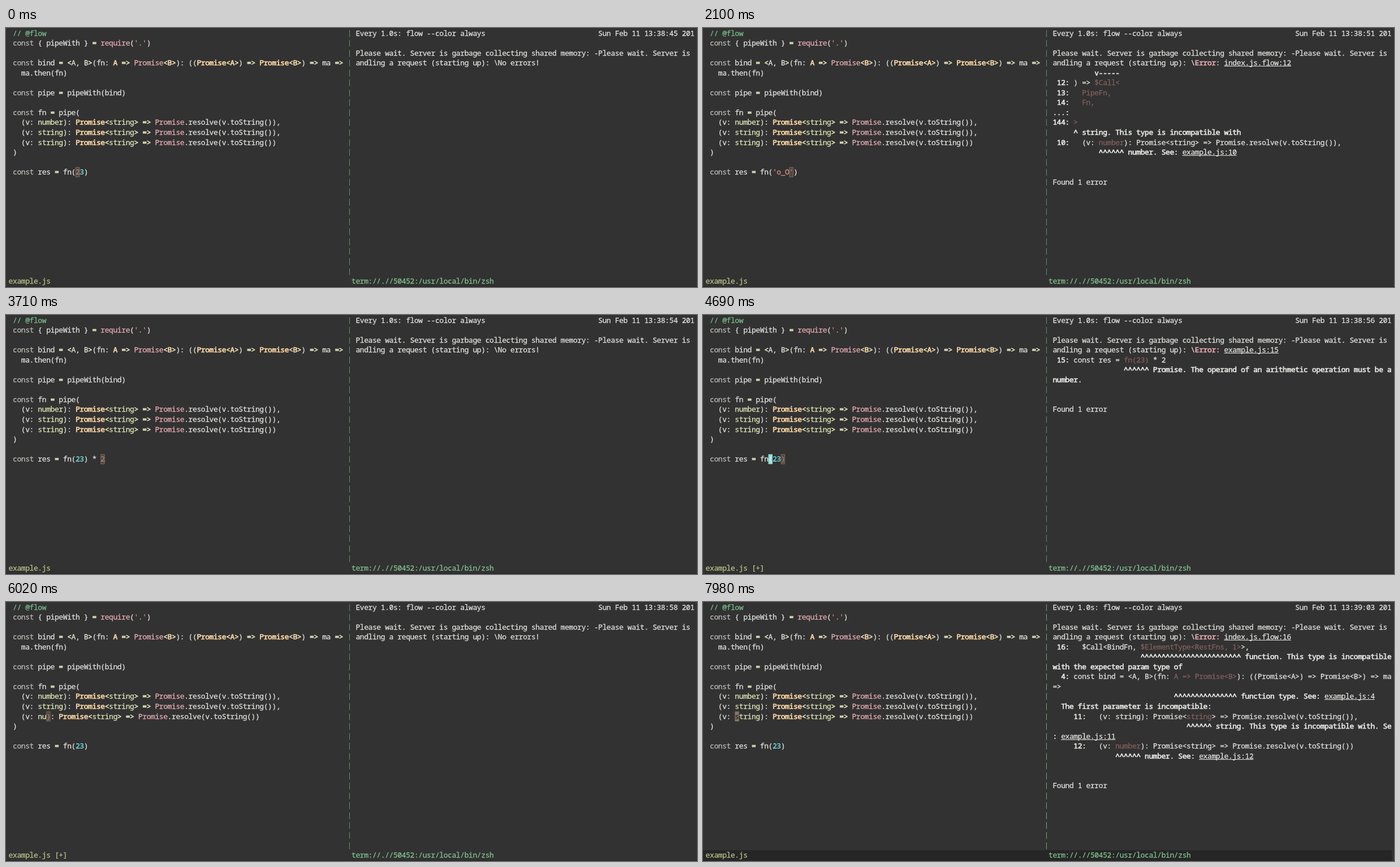
Recreate the animation shown at these times as an HTML page with a canvas. Size 1222 px wide and 458 px high, loop 8000 ms.

```html
<!DOCTYPE html>
<html lang="en">
<head>
<meta charset="utf-8">
<title>Terminal session</title>
<style>
html, body { margin: 0; width: 100%; height: 100%; overflow: hidden; background: #323232; }
canvas { display: block; }
</style>
</head>
<body>
<canvas id="stage" width="1222" height="458"></canvas>
<script>
const ctx = document.getElementById('stage').getContext('2d');
const LOOP = 8000, W = 1222, H = 458;
const CELL = 7.395, ROW = 17.54, LEFT = 4.6, BASE = 13.6;
const CODE = 1, PANE = 83;
const FACE = '13px "Noto Sans Mono", "DejaVu Sans Mono", monospace';

const BG = '#323232', TEXT = '#e0e0de', GREEN = '#82c08f';
// Inline markup: ~x...~ paints the enclosed text in style x
const STYLES = {
  b: { color: '#e6e6e4', bold: true },
  c: { color: '#78bb88' },
  k: { color: '#b6b6b2' },
  a: { color: '#e0e2bb', bold: true },
  o: { color: '#ffd9a5', bold: true },
  l: { color: '#dfe5b5' },
  p: { color: '#e6abb3' },
  n: { color: '#76dede' },
  s: { color: '#dc8d82' },
  d: { color: '#805f5d' },
  e: { color: '#eaa9b2', bold: true },
  u: { color: TEXT, underline: true }
};

const colX = col => LEFT + col * CELL;
const rowY = row => BASE + row * ROW;

function fill(x, y, w, h, color) {
  ctx.fillStyle = color;
  ctx.fillRect(x, y, w, h);
}

// A fine outline gives the glyphs their smoothed, heavier look
function put(text, col, row, { color = TEXT, bold, underline } = {}) {
  ctx.font = FACE;
  ctx.fillStyle = ctx.strokeStyle = color;
  ctx.lineWidth = bold ? 0.7 : 0.3;
  ctx.lineJoin = 'round';
  [...text].forEach((ch, i) => {
    if (ch === ' ') return;
    ctx.fillText(ch, colX(col + i), rowY(row));
    ctx.strokeText(ch, colX(col + i), rowY(row));
  });
  if (underline) ctx.fillRect(colX(col), Math.round(rowY(row) + 1), text.length * CELL, 1);
}

function line(src, col, row) {
  src.split('~').forEach((part, i) => {
    const marked = i % 2 === 1;
    const text = marked ? part.slice(1) : part;
    put(text, col, row, marked ? STYLES[part[0]] : undefined);
    col += text.length;
  });
}

const lines = (list, col, row) => list.forEach((s, i) => line(s, col, row + i));

// Editor
const step = (type, end) =>
  `  (v: ~l${type}~): ~oPromise~~a<~~lstring~~a>~ ~a=>~ ~pPromise~.resolve(v.toString())${end}`;

const code = s => [
  '~c// @flow~',
  "~kconst~ { pipeWith } ~a=~ ~prequire~(~s'.'~)",
  '',
  '~kconst~ bind ~a=~ ~a<~A, B~a>~(fn: ~oA~ ~a=>~ ~pPromise~~a<~~oB~~a>~): ((~oPromise~~a<~~oA~~a>~) ~a=>~ ~oPromise~~a<~~oB~~a>~) ~a=>~ ma ~a=>~',
  '  ma.then(fn)',
  '',
  '~kconst~ pipe ~a=~ pipeWith(bind)',
  '',
  '~kconst~ fn ~a=~ pipe(',
  step('number', ','),
  step('string', ','),
  step(s.type, ''),
  ')',
  '',
  `~kconst~ res ~a=~ fn(~${s.arg[0] === "'" ? 's' : 'n'}${s.arg}~)${s.tail}`
];

// Edits over time; each entry changes only what it names.
// cur: [row, column, character, look], match: [row, column]
const call = (i, ch, look = 'dim') => [14, i, ch, look];
const param = (i, ch, look = 'dim') => [11, i, ch, look];
const edits = [
  [0, { arg: '23', tail: '', type: 'string', dirty: false, cur: call(15, '2'), match: null, cmd: false }],
  [400, { arg: '', dirty: true, cur: call(15, ')') }],
  [540, { arg: "'", cur: call(16, ')') }],
  [660, { arg: "'o", cur: call(17, ')') }],
  [800, { arg: "'o_", cur: call(18, ')') }],
  [940, { arg: "'o_O", cur: call(19, ')') }],
  [1060, { arg: "'o_O'", cur: call(19, "'") }],
  [1320, { cur: null, cmd: true }],
  [1490, { dirty: false, cur: call(19, "'"), cmd: false }],
  [2380, { arg: '23', dirty: true, cur: call(15, '2') }],
  [2600, { dirty: false }],
  [3080, { tail: ' ', dirty: true, cur: call(19, ' ') }],
  [3190, { tail: ' *', cur: call(20, ' ') }],
  [3300, { tail: ' * ', cur: call(21, ' ') }],
  [3410, { tail: ' * 2', cur: call(21, '2') }],
  [3680, { dirty: false }],
  [4480, { tail: '', dirty: true, cur: call(17, ')'), match: [14, 14] }],
  [4850, { dirty: false }],
  [5250, { cur: param(6, 's', 'block'), match: null }],
  [5530, { cur: param(6, 's', 'line') }],
  [5820, { type: '', dirty: true, cur: param(6, ')') }],
  ...[...'number'].map((_, i) => [
    5900 + i * 80,
    { type: 'number'.slice(0, i + 1), cur: param(7 + i, ')'), match: i === 5 ? [11, 2] : null }
  ]),
  [6580, { dirty: false }],
  [7440, { type: 'string', dirty: true, cur: param(6, 's', 'block'), match: null }],
  [7690, { dirty: false }]
];

function cursor([row, col, ch, look]) {
  const x = colX(CODE + col), y = rowY(row) - 13;
  if (look === 'line') return fill(x, y + ROW - 1, CELL, 1, '#b5b5a8');
  fill(x, y, CELL, ROW, look === 'block' ? '#857560' : '#7f6c60');
  if (look === 'dim') fill(x + 1, y + 1, CELL - 2, ROW - 2, '#53443e');
  put(ch, CODE + col, row, { color: look === 'block' ? '#242424' : '#a38670' });
}

function editor(s) {
  lines(code(s), CODE, 0);
  if (s.match) {
    const [row, col] = s.match;
    fill(colX(CODE + col), rowY(row) - 13, CELL, ROW, '#90dcda');
    put('(', CODE + col, row, { color: '#e6eeee' });
  }
  if (s.cur) cursor(s.cur);
  if (s.cmd) fill(226, 457, 8, 1, '#858585');
}

// Watch pane
const wait = 'Please wait. Server is garbage collecting shared memory: -Please wait. Server is';
const busy = 'andling a request (starting up): \\';
const resolve = ' => Promise.resolve(v.toString())';
const link = place => place ? `~u${place}~` : '';
const bold = s => `~b${s}~`;
const carets = (col, n, s, place) => ' '.repeat(col) + bold('^'.repeat(n) + ' ' + s) + link(place);
const gutter = s => s.replace(/^ *[\d.]+:/, bold);
const failed = (place, ...rest) =>
  [wait, `${busy}~eError: ~${link(place)}`, ...rest.map(gutter), '', '', 'Found 1 error'];

const screens = {
  clean: [wait, busy + 'No errors!'],
  recheck: [
    'Please wait. Server is rechecking (merged files 0/1 (0.0%)): -Please wait. Server',
    'is rechecking (finishing up): \\Please wait. Server is rechecking (starting up): |',
    'lease wait. Server is rechecking (garbage collecting shared memory): /Please wait',
    ' Server is rechecking (parsed files 0/1 (0.0%)): -Please wait. Server is rechecki',
    'g (garbage collecting shared memory): \\Please wait. Server is rechecking (resolvi',
    'g dependencies): |Please wait. Server is rechecking (garbage collecting shared me',
    'ory): /Please wait. Server is rechecking (calculating dependencies): -Please wait',
    ' Server is rechecking (finishing up): \\Please wait. Server is garbage collecting',
    'hared memory: |Please wait. Server is handling a request (starting up): /Please w',
    'it. Server is handling a request (collating errors): -No errors!'
  ],
  badArg: failed('index.js.flow:12',
    bold('          v-----'),
    ' 12: ) => ~d$Call<~',
    ' 13:   ~dPipeFn,~',
    ' 14:   ~dFn,~',
    '...:',
    '144: ~d>~',
    carets(5, 1, 'string. This type is incompatible with'),
    ` 10:   (v: ~dnumber~): Promise<string>${resolve},`,
    carets(11, 6, 'number. See: ', 'example.js:10')),
  badMath: failed('example.js:15',
    ' 15: const res = ~dfn(23)~ * 2',
    carets(17, 6, 'Promise. The operand of an arithmetic operation must be a'),
    bold('number.')),
  badPipe: failed('index.js.flow:16',
    ' 16:   $Call<BindFn, ~d$ElementType<RestFns, 1>~>,',
    carets(21, 24, 'function. This type is incompatible'),
    bold('with the expected param type of'),
    '  4: const bind = <A, B>(fn: ~dA => Promise<B>~): ((Promise<A>) => Promise<B>) => ma',
    '=>',
    carets(29, 15, 'function type. See: ', 'example.js:4'),
    bold('  The first parameter is incompatible:'),
    `     11:   (v: string): Promise<~dstring~>${resolve},`,
    carets(32, 6, 'string. This type is incompatible with. Se'),
    bold(': ') + link('example.js:11'),
    `     12:   (v: ~dnumber~): Promise<string>${resolve}`,
    carets(15, 6, 'number. See: ', 'example.js:12'))
};

// Seconds past 13:38:00 at which the pane switches
const shows = [[45, 'clean'], [51, 'badArg'], [53, 'clean'], [55, 'badMath'],
  [57, 'recheck'], [58, 'clean'], [61, 'badPipe']];

const pace = [[0, 45.5], [1400, 49.5], [2730, 52.5], [4690, 56.5], [5670, 57.5], [6930, 60.5], [8000, 63.5]];

function clock(t) {
  const i = pace.findIndex(p => p[0] > t);
  const [t0, s0] = pace[i - 1], [t1, s1] = pace[i];
  return Math.floor(s0 + (s1 - s0) * (t - t0) / (t1 - t0));
}

function watch(sec) {
  const mm = 38 + Math.floor(sec / 60), ss = String(sec % 60).padStart(2, '0');
  put('Every 1.0s: flow --color always', PANE, 0);
  put(`Sun Feb 11 13:${mm}:${ss} 201`, 141, 0);
  lines(screens[shows.filter(s => s[0] <= sec).pop()[1]], PANE, 2);
}

function frame(t, sec) {
  const state = Object.assign({}, ...edits.filter(e => e[0] <= t).map(e => e[1]));
  const bar = sec === 57 || sec >= 63;
  fill(0, 0, W, H, BG);
  if (bar) fill(0, 439, 1218, 19, '#262626');
  else fill(0, 456, W, 2, '#2b2b2b');
  for (let r = 0; r < 25; r++) fill(607, Math.round(rowY(r) - 10), 1, 12, bar ? '#69a878' : '#57926a');
  editor(state);
  watch(sec);
  put('example.js' + (state.dirty ? ' [+]' : ''), 0, 25, { color: '#b9be88' });
  put('term://.//50452:/usr/local/bin/zsh', 82, 25, { color: GREEN });
}

const start = performance.now();
function tick() {
  const t = (performance.now() - start) % LOOP;
  frame(t, clock(t));
  requestAnimationFrame(tick);
}
tick();
</script>
</body>
</html>
```
